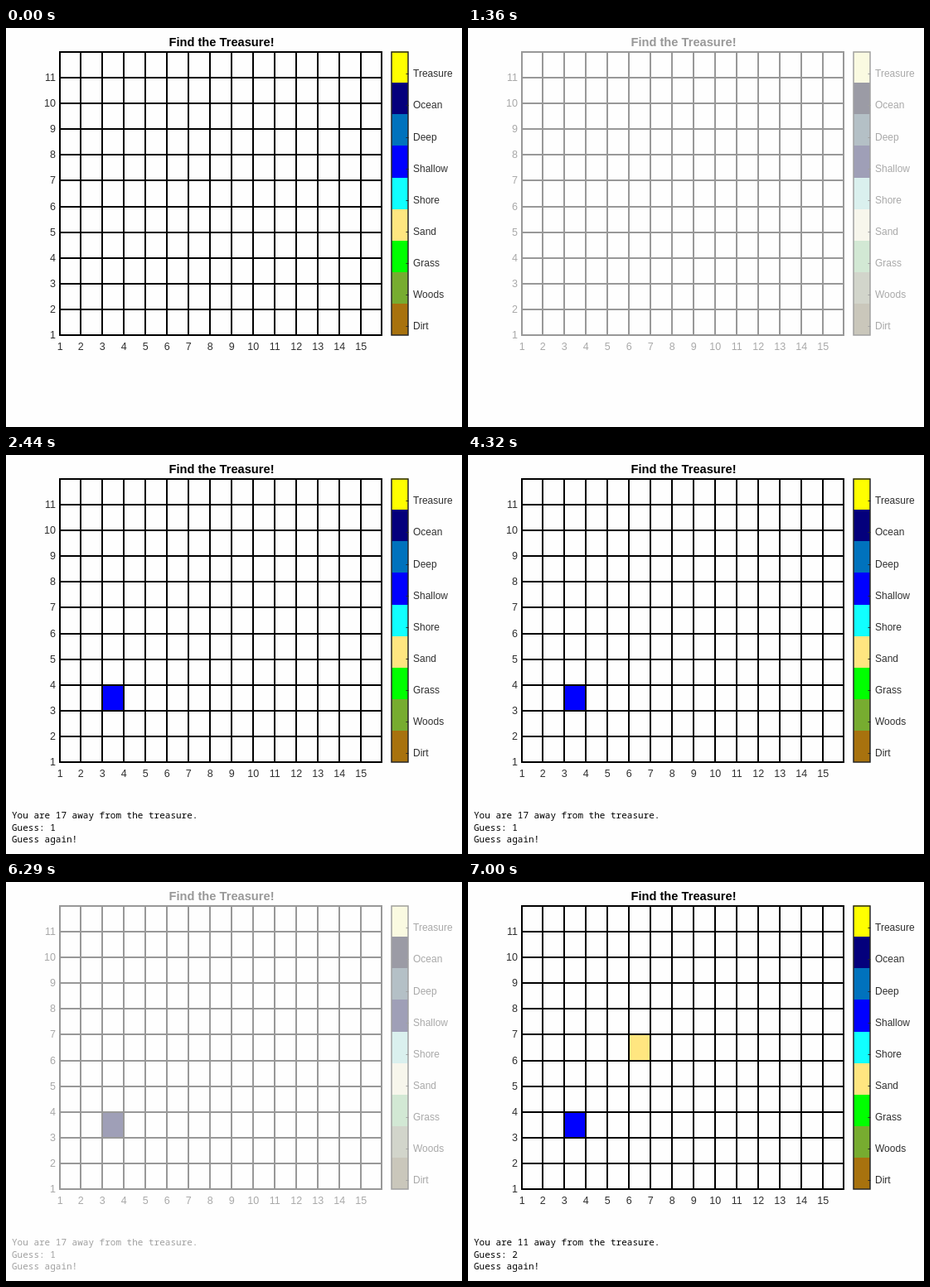
Animation, 550 px wide and 482 px high, one loop 8 s. Source, as an HTML page with a canvas:

```html
<!DOCTYPE html>
<html lang="en">
<head>
<meta charset="utf-8">
<title>Find the Treasure!</title>
<style>
html, body { margin: 0; width: 100%; height: 100%; overflow: hidden; background: #fefefe; }
canvas { display: block; }
</style>
</head>
<body>
<canvas id="stage" width="550" height="482"></canvas>
<script>
const ctx = document.getElementById("stage").getContext("2d");
const SANS = '"Liberation Sans", Arial, sans-serif';
const MONO = '"Noto Sans Mono", "DejaVu Sans Mono", monospace';
const LOOP = 8000;

// name, bright colour, faded colour
const terrain = [
  ["Treasure", "#ffff00", "#fafae1"],
  ["Ocean", "#04007c", "#9b9ba5"],
  ["Deep", "#0072bd", "#b4c0c6"],
  ["Shallow", "#0000ff", "#9f9fb7"],
  ["Shore", "#10ffff", "#daf0ee"],
  ["Sand", "#ffe680", "#f7f6ec"],
  ["Grass", "#00ff00", "#d2e8d4"],
  ["Woods", "#77ac30", "#d2d5cb"],
  ["Dirt", "#a8720e", "#cac7bb"]
];

const gridX = n => Math.min(453, Math.max(65, 38 + n * 26));
const gridY = n => Math.round(371 - (n - 1) * 342 / 11);

function text(str, x, y, font, color, align = "left") {
  ctx.font = font;
  ctx.fillStyle = color;
  ctx.textAlign = align;
  ctx.fillText(str, x, y);
}

function line(x1, y1, x2, y2) {
  ctx.beginPath();
  ctx.moveTo(x1, y1);
  ctx.lineTo(x2, y2);
  ctx.stroke();
}

function cell(col, row, kind, faded) {
  const x = gridX(col), y = gridY(row + 1);
  ctx.fillStyle = terrain[kind][faded ? 2 : 1];
  ctx.fillRect(x, y, gridX(col + 1) - x, gridY(row) - y);
}

function drawMap(t, faded) {
  const ink = faded ? "#a9a9a9" : "#303030";
  const tickFont = "12.5px " + SANS;

  if (t >= 2440) cell(3, 3, 3, faded);
  if (t >= 7000) cell(6, 6, 5, faded);

  ctx.strokeStyle = faded ? "#989898" : "#000";
  ctx.lineWidth = 2;
  ctx.lineCap = "square";
  for (let n = 1; n <= 16; n++) {
    line(gridX(n), 29, gridX(n), 371);
    if (n < 16) text(n, gridX(n) + .3, 389, tickFont, ink, "center");
  }
  for (let n = 1; n <= 12; n++) {
    line(65, gridY(n), 453, gridY(n));
    if (n < 12) text(n, 60, gridY(n) + 4, tickFont, ink, "right");
  }
  text("Find the Treasure!", 260, 22, "bold 14.67px " + SANS, faded ? "#989898" : "#000", "center");
}

function drawLegend(faded) {
  const ink = faded ? "#a9a9a9" : "#303030";
  const top = i => Math.round(28.2 + i * 38.08);
  const labelY = i => Math.round(59.3 + i * 38.1);
  terrain.forEach(([name, bright, pale], i) => {
    ctx.fillStyle = faded ? pale : bright;
    ctx.fillRect(465, top(i), 20, top(i + 1) - top(i));
    text(name, 491, labelY(i), "12px " + SANS, ink);
  });
  ctx.strokeStyle = faded ? "#a0a0a0" : "#262626";
  ctx.lineWidth = 1.5;
  ctx.strokeRect(465, 29, 20, 342);
  ctx.lineWidth = 1;
  terrain.forEach((_, i) => line(483, labelY(i) - 3.5, 485, labelY(i) - 3.5));
}

function drawConsole(t) {
  if (t < 1940) return;
  const second = t >= 6770;
  const color = t >= 5570 && !second ? "#a0a0a0" : "#000";
  const rows = [
    `You are ${second ? 11 : 17} away from the treasure.`,
    `Guess: ${second ? 2 : 1}`,
    "Guess again!"
  ];
  rows.forEach((row, i) => text(row, 7, Math.round(439 + i * 14.5), "11px " + MONO, color));
}

const start = performance.now();
function frame(now) {
  const t = Math.max(0, now - start) % LOOP;
  const faded = (t >= 500 && t < 2440) || (t >= 5570 && t < 7000);
  ctx.fillStyle = "#fefefe";
  ctx.fillRect(0, 0, 550, 482);
  drawMap(t, faded);
  drawLegend(faded);
  drawConsole(t);
  requestAnimationFrame(frame);
}
requestAnimationFrame(frame);
</script>
</body>
</html>
```
